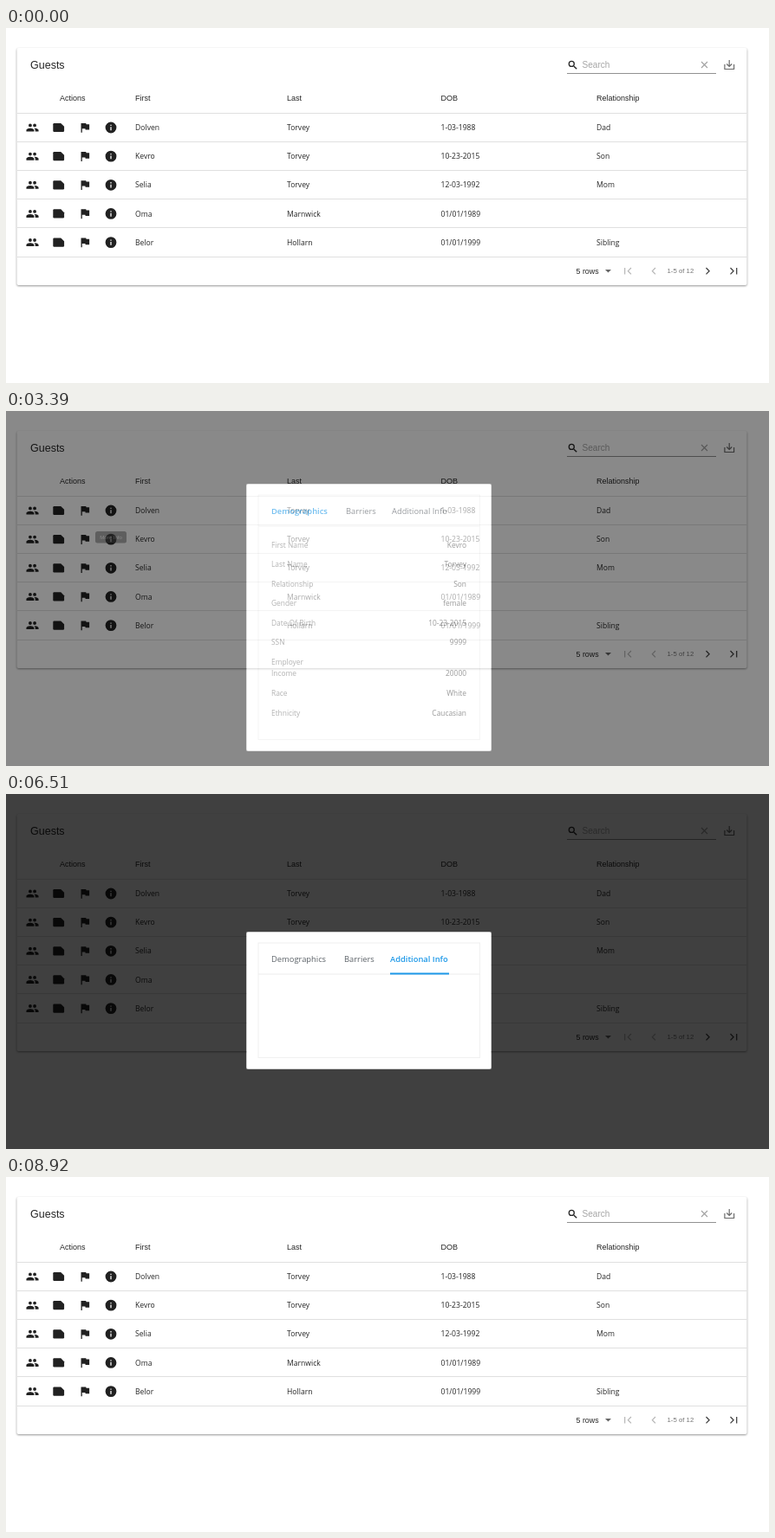
These frames come from a looping animation (880x410 px, 9950 ms). An HTML page:

```html
<!DOCTYPE html>
<html lang="en">
<head>
<meta charset="utf-8">
<title>Guests</title>
<style>
  html, body { margin: 0; width: 100%; height: 100%; overflow: hidden; background: #fff; }
  svg { display: block; width: 880px; height: 410px; }
  text { white-space: pre; }
  .ui { font-family: "Liberation Sans", Arial, sans-serif; }
  .body { font-family: "Open Sans", "Noto Sans", sans-serif; }
  .card { fill: #fff; filter: drop-shadow(0 1px .8px rgba(0, 0, 0, .42)); }
</style>
</head>
<body>
<svg id="stage" viewBox="0 0 880 410"></svg>
<script>
const LOOP = 9950, FADE = 300;
const INK = '#262626', BLUE = [28, 152, 232], GREY = [92, 98, 104];
const stage = document.getElementById('stage');

function add(parent, tag, attrs = {}, content) {
  const node = document.createElementNS('http://www.w3.org/2000/svg', tag);
  for (const key in attrs) node.setAttribute(key, attrs[key]);
  if (content) node.textContent = content;
  parent.append(node);
  return node;
}

// Text whose line is centred on y.
function label(parent, content, x, y, size, attrs = {}) {
  return add(parent, 'text',
    { class: 'body', x, y: y + size * 0.36, 'font-size': size, fill: INK, ...attrs }, content);
}

const ui = { class: 'ui' };
const line = (parent, d, stroke, width = 1) =>
  add(parent, 'path', { d, stroke, 'stroke-width': width, fill: 'none' });

// ---- Guest table ----
const page = add(stage, 'g');
add(page, 'rect', { class: 'card', x: 12.5, y: 23, width: 842, height: 274, rx: 2 });
label(page, 'Guests', 28, 42.5, 12.5, ui);

line(page, 'M655 44.3L658.2 47.3', INK, 1.5);
add(page, 'circle', { cx: 652.3, cy: 41.4, r: 3, fill: 'none', stroke: INK, 'stroke-width': 1.3 });
label(page, 'Search', 664.5, 42.3, 10.1, { ...ui, fill: '#a6a6a6' });
line(page, 'M802 39l7 7m0-7l-7 7', '#a0a0a0', 1.1);
line(page, 'M647 52.5H819', '#919191');
line(page, 'M828.9 42v5.5H839.6V42M834.2 37v7M831.2 41.5l3 3 3-3', '#6b6b6b', 1.2);

const columns = [149, 324, 501.5, 681];
['First', 'Last', 'DOB', 'Relationship'].forEach((name, i) => label(page, name, columns[i], 80.5, 9, ui));
label(page, 'Actions', 62, 80.5, 9, ui);

const icons = [
  'M16 11a3 3 0 1 0 0-6 3 3 0 0 0 0 6zM8 11a3 3 0 1 0 0-6 3 3 0 0 0 0 6zM8 13c-2.3 0-7 1.2-7 3.5V19h14v-2.5C15 14.200 10.300 13 8 13zM16 13l-1 .05c1.200.8 2 2 2 3.450V19h6v-2.500C23 14.200 18.300 13 16 13z',
  'M22 10l-6-6H4a2 2 0 0 0-2 2v12a2 2 0 0 0 2 2h16a2 2 0 0 0 2-2z',
  'M14.4 6L14 4H5v17h2v-7h5.6l.4 2h7V6z',
  'M12 2a10 10 0 1 0 0 20 10 10 0 0 0 0-20zm1 15h-2v-6h2zm0-8h-2V7h2z'
];
const iconX = [30.5, 60.7, 91, 121];
const ripple = add(page, 'circle', { cx: 121, cy: 115, fill: '#000' });
const guests = [
  ['Dolven', 'Torvey', '1-03-1988', 'Dad'],
  ['Kevro', 'Torvey', '10-23-2015', 'Son'],
  ['Selia', 'Torvey', '12-03-1992', 'Mom'],
  ['Oma', 'Marnwick', '01/01/1989', ''],
  ['Belor', 'Hollarn', '01/01/1999', 'Sibling']
];
guests.forEach((guest, row) => {
  const y = 115 + row * 33.15;
  icons.forEach((d, i) => add(page, 'path',
    { d, fill: '#212121', transform: `translate(${iconX[i]} ${y}) scale(.64) translate(-12 -12)` }));
  guest.forEach((value, i) => label(page, value, columns[i], y, 8.6));
});
for (let i = 0; i < 6; i++) line(page, `M13 ${Math.floor(98 + i * 33.2) + 0.5}H854.5`, '#e0e0e0');

label(page, '5 rows', 657.5, 280.5, 8.9, ui);
add(page, 'path', { d: 'M691 279h7l-3.500 3.500z', fill: '#666' });
label(page, '1-5 of 12', 762.5, 280.5, 7.8, { ...ui, fill: '#777' });
line(page, 'M713.700 277v7.500M721 277l-3.600 3.700 3.600 3.700M749 277l-3.600 3.700 3.600 3.700', '#b5b5b5', 1.2);
line(page, 'M807.500 277l3.600 3.700-3.600 3.700M835.500 277l3.600 3.700-3.600 3.700M842.700 277v7.500', '#444', 1.3);

const tooltip = add(page, 'g');
add(tooltip, 'rect', { x: 103, y: 139, width: 36, height: 13.500, rx: 2.5, fill: '#616161', 'fill-opacity': 0.9 });
label(tooltip, 'More Info', 121, 145.7, 6.1, { ...ui, fill: '#fff', 'text-anchor': 'middle' });

// ---- Modal ----
const modal = add(stage, 'g');
const backdrop = add(modal, 'path', { 'fill-rule': 'evenodd', 'fill-opacity': 0.75 });
const sheet = add(modal, 'rect', { x: 277.5, width: 282, rx: 2, fill: '#fff' });
const content = add(modal, 'g');
const frame = add(content, 'rect', { x: 291, y: 12.5, width: 255.5, fill: 'none', stroke: '#f0f0f0' });
line(content, 'M291 48.500H546.500', '#ececec');
const bar = add(content, 'rect', { y: 47, height: 2, fill: `rgb(${BLUE})` });

const details = [
  ['First Name', 'Kevro', 70], ['Last Name', 'Torvey', 92.5], ['Relationship', 'Son', 115],
  ['Gender', 'female', 137.5], ['Date Of Birth', '10-23-2015', 160], ['SSN', '9999', 182.5],
  ['Employer', '', 205], ['Income', '20000', 218.5], ['Race', 'White', 241.5], ['Ethnicity', 'Caucasian', 264]
];
const barriers = [
  ['HIV/AIDS:', '', 70], ['Alcohol Abuse:', '', 84], ['Chronic Health Issues:', '', 97.5],
  ['Physcial Disabilites:', '', 125], ['Development Disabilites:', '', 139], ['Drug Abuse:', '', 152.5],
  ['Indefinite Conditions:', 'no', 166.5], ['Issues:', '', 189]
];
const paneHeights = [308, 238, 158];
const panes = [details, barriers, []].map(rows => {
  const pane = add(content, 'g');
  for (const [name, value, y] of rows) {
    label(pane, name, 306, y, 8.4, { fill: '#858585' });
    label(pane, value, 531, y, 8.4, { fill: '#5c5c5c', 'text-anchor': 'end' });
  }
  return pane;
});

const tabs = ['Demographics', 'Barriers', 'Additional Info'].map(name => label(content, name, 306, 31.5, 9.35));
const regularWidths = [64, 33, 66], activeWidths = [66, 35, 68];

// ---- Timing ----
const paneKeys = [[0, 0], [4880, 1], [5830, 2], [6700, 1], [7620, 0]];
const barXKeys = [[0, 306], [4920, 390], [5870, 443], [6740, 390], [7660, 306]];
const barWidthKeys = [[0, 0], [3390, 66], [4920, 35], [5870, 68], [6740, 35], [7660, 66]];
// Share of blue per tab: partial on hover, full when active.
const tintKeys = [
  [[0, 1], [4920, 0], [7050, 0.8], [7660, 1]],
  [[0, 0], [4270, 0.8], [4920, 1], [5870, 0], [6510, 0.8], [6740, 1], [7660, 0]],
  [[0, 0], [5290, 0.8], [5870, 1], [6740, 0]]
];

function ease(t, from, to) {
  const k = Math.min(1, Math.max(0, (t - from) / (to - from)));
  return k * k * (3 - 2 * k);
}
const step = (keys, t) => keys.filter(key => key[0] <= t).pop()[1];
const track = (keys, t) => keys.reduce(
  (value, [time, target], i) => i ? value + (target - value) * ease(t, time, time + FADE) : target, 0);

function set(node, attrs) {
  for (const key in attrs) node.setAttribute(key, attrs[key]);
}

function drawModal(t) {
  const pane = step(paneKeys, t), active = step(paneKeys, Math.max(0, t - 40));
  const height = paneHeights[pane], top = 238.5 - height / 2;
  set(backdrop, { d: `M0 0H880V410H0zM277.500 ${top}h282v${height}h-282z` });
  set(sheet, { y: top, height });
  set(content, { transform: `translate(0 ${top})` });
  set(frame, { height: height - 25.5 });
  set(bar, { x: track(barXKeys, t), width: track(barWidthKeys, t) });
  panes.forEach((node, i) => set(node, { display: i === pane ? 'inline' : 'none' }));

  let x = 306;
  tabs.forEach((tab, i) => {
    const tint = track(tintKeys[i], t);
    const color = GREY.map((c, j) => Math.round(c + (BLUE[j] - c) * tint));
    set(tab, { x, fill: `rgb(${color})`, 'font-weight': i === active ? 600 : 400 });
    x += (i === active ? activeWidths : regularWidths)[i] + 20;
  });
}

function draw(t) {
  set(tooltip, { opacity: ease(t, 1620, 1730) - ease(t, 3300, 3500) });
  set(ripple, {
    r: 15 * ease(t, 2410, 2870),
    opacity: (0.1 + 0.17 * ease(t, 2410, 2870)) * (1 - ease(t, 3230, 3370))
  });
  const shown = t < 8920 ? ease(t, 3160, 3560) - ease(t, 8615, 9025) : 0;
  set(modal, { opacity: shown, display: shown > 0 ? 'inline' : 'none' });
  if (shown > 0) drawModal(t);
}

const start = performance.now();
function tick() {
  draw((performance.now() - start) % LOOP);
  requestAnimationFrame(tick);
}
tick();
</script>
</body>
</html>
```
